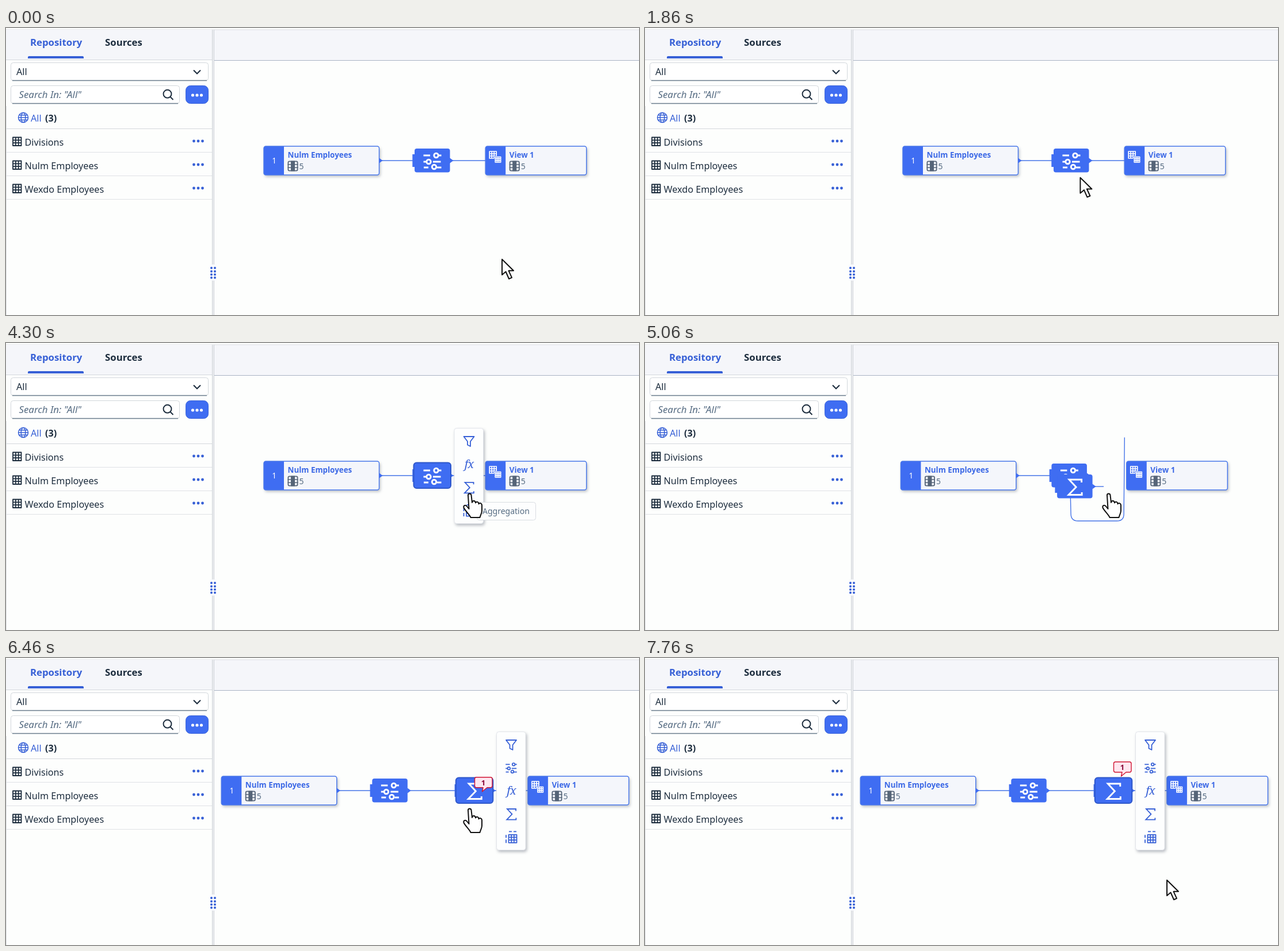
An HTML page that plays this animation: 1100x500 px, repeating every 10 s.

```html
<!DOCTYPE html>
<html lang="en">
<head>
<meta charset="utf-8">
<title>Adding an aggregation step</title>
<style>
  html, body { margin: 0; width: 100%; height: 100%; overflow: hidden; background: #fdfefd; }
  svg { display: block; width: 1100px; height: 500px; }
  text { font-family: "Noto Sans", "Open Sans", sans-serif; font-size: 16.2px; fill: #1d2d3e; white-space: pre; }
  .bold { font-weight: 700; }
  .tab { font-size: 16.8px; font-weight: 700; }
  .accent { fill: #3760d6; }
  .hint { font-size: 16.8px; font-style: italic; fill: #556b82; }
  .name { font-size: 13.4px; font-weight: 700; fill: #3c69e6; }
  .count { font-size: 14px; fill: #556b82; }
  .order { font-size: 13.5px; fill: #fff; text-anchor: middle; }
  .fx { font: italic 20px "Noto Serif", serif; letter-spacing: -1px; fill: #3760d6; text-anchor: middle; }
  .badge { font-size: 13px; font-weight: 700; fill: #8a0638; text-anchor: middle; }
  .shadow { filter: drop-shadow(2px 3px 2.5px rgba(40, 50, 70, .32)); }
  .line { fill: none; stroke: #4473e8; stroke-width: 1.4; }
  .icon { fill: none; stroke: #3760d6; stroke-width: 1.8; }
  .white { fill: none; stroke: #fff; stroke-width: 2.9; }
  .pointer { fill: #fff; stroke: #111; stroke-width: 2; stroke-linejoin: round; }
</style>
</head>
<body>
<svg id="stage" viewBox="0 0 1100 500"></svg>
<script>
const BLUE = "#3f6df2", ACCENT = "#3760d6", INK = "#1d2d3e";

const rect = (x, y, w, h, fill, more = "") =>
  `<rect x="${x}" y="${y}" width="${w}" height="${h}" fill="${fill}" ${more}/>`;
const text = (x, y, cls, value) => `<text x="${x}" y="${y}" class="${cls}">${value}</text>`;
const path = (d, more) => `<path d="${d}" ${more}/>`;
const group = (x, y, body, more = "") => `<g transform="translate(${x} ${y})" ${more}>${body}</g>`;
const dots = (x, y, gap, r, fill) =>
  [0, 1, 2].map(i => `<circle cx="${x + i * gap}" cy="${y}" r="${r}" fill="${fill}"/>`).join("");

// Icons centred on their own origin
const sliders = path(`M-15.5-10H-4M11-10H15.5M-15.5 1H-11M1 1H14.5M-15-11
  M-15 11H-7M8 11H15.5`, "") +
  [[6.5, -10], [-6.5, 1], [3, 10]].map(([x, y]) => `<circle cx="${x}" cy="${y}" r="3.7"/>`).join("");
const sigma = path("M11.5-8V-13H-10L2 0L-11 13.5H12V9", "");
const grid = (size, stroke, width) => {
  const a = size / 3, b = size * 2 / 3;
  return path(`M0 0H${size}V${size}H0ZM${a} 0V${size}M${b} 0V${size}M0 ${a}H${size}M0 ${b}H${size}`,
    `fill="none" stroke="${stroke}" stroke-width="${width}" stroke-linejoin="round"`);
};
const scaled = (k, body, width) => `<g transform="scale(${k})" class="icon" style="stroke-width:${width}">${body}</g>`;
const menuIcons = {
  filter: path("M-9-8.5H9L2.5 0V8.5L-2.5 6V0Z", 'class="icon" stroke-linejoin="round"'),
  sliders: scaled(.63, sliders, 2.8),
  formula: text(0, 6, "fx", "fx"),
  sigma: scaled(.7, sigma, 2.6),
  columns: group(-4.5, -4.5, grid(14, ACCENT, 1.8)) +
    path("M-4-10H1M4-10H9M-9-4V1M-9 4V10", 'class="icon"')
};

const menu = (id, x, y, names) => {
  const height = names.length * 40 + 6;
  const items = names.map((name, i) => group(25.5, 23 + i * 40.2, menuIcons[name])).join("");
  return group(x, y, rect(0, 0, 50.5, height, "#fdfefe",
    'rx="4" stroke="#e2e5ea" class="shadow"') + items, `id="${id}" opacity="0"`);
};

const countIcon = group(0, 0, rect(.9, .9, 16.2, 16.2, "none", 'rx="2" stroke="#566578" stroke-width="1.8"') +
  rect(5.5, 0, 7, 18, "#566578") + path("M0 6.2H18M0 11.8H18", 'stroke="#566578" stroke-width="1.6"'));

const card = (width, name, mark) =>
  rect(.5, .5, width, 50, "#f4f6fb", 'rx="3.5" class="shadow"') +
  path("M4 .5H35.5V50.5H4Q.5 50.5 .5 47V4Q.5 .5 4 .5Z", `fill="${BLUE}"`) +
  rect(.5, .5, width, 50, "none", 'rx="3.5" stroke="#4a78ea" stroke-width="1.5"') +
  mark + text(42, 20.5, "name", name) + group(42, 26, countIcon) + text(62, 40.5, "count", "5");

const step = (icon, selectedId) =>
  rect(-3.7, 10, 6, 22, BLUE) + path("M61 16.3L67.5 21L61 25.7Z", `fill="${BLUE}"`) +
  rect(0, 0, 61.5, 41.5, BLUE, 'rx="4"') +
  rect(-1.5, -1.5, 64.5, 44.5, BLUE, `id="${selectedId}" rx="5" stroke="#2f58ca" stroke-width="2" visibility="hidden"`) +
  group(31, 22, icon, 'class="white"');

const outPort = x => path(`M${x} 21L${x + 6} 25.5L${x} 30Z`, `fill="${BLUE}"`);

const sidebar = () => {
  const rows = ["Divisions", "Nulm Employees", "Wexdo Employees"].map((name, i) => group(0, i * 41,
    group(12, 190.5, grid(14.5, INK, 1.8)) + text(32.5, 205, "", name) +
    dots(326.5, 197, 7.5, 2.4, ACCENT) + rect(1, 216, 357, 1, "#dfe2e6"))).join("");
  const field = (y, w, h) => rect(8.5, y, w, h, "#fff", 'rx="4" stroke="#d3d7dc"') +
    path(`M11 ${y + h}H${w + 6}`, 'stroke="#6a7c8c" stroke-width="1.3"');
  const grip = [418, 424, 429.5, 435].map(y =>
    [357, 363].map(x => `<circle cx="${x}" cy="${y}" r="2" fill="${ACCENT}"/>`).join("")).join("");
  return rect(0, 3, 358, 52, "#f5f6fa") + rect(0, 55, 358, 1, "#d4d8dd") +
    rect(0, 136, 1, 364, "#dcdfe3") +
    text(42, 31, "tab accent", "Repository") + text(172, 31, "tab", "Sources") +
    path("M38 53V51Q38 49 40 49H133Q135 49 135 51V53Z", `fill="${ACCENT}"`) +
    field(60.5, 343, 31) + text(18, 82, "", "All") +
    path("M326 73.5L332 79.5L338 73.5", `fill="none" stroke="${INK}" stroke-width="2.1"`) +
    field(100.5, 293, 31) + text(22.5, 122, "hint", "Search In: \"All\"") +
    path("M287.5 114.8A7 7 0 1 1 273.5 114.8A7 7 0 1 1 287.5 114.8M285.5 120L290.5 125",
      `fill="none" stroke="${INK}" stroke-width="2"`) +
    rect(312.5, 100.5, 39, 31, BLUE, 'rx="8" stroke="#3a64da"') + dots(324.5, 117, 7.5, 2.6, "#fff") +
    group(30, 156, `<circle r="8.5"/><ellipse rx="3.8" ry="8.5"/>` +
      path("M-8.5 0H8.5M-7.3-4.3H7.3M-7.3 4.3H7.3", ""), 'class="icon" style="stroke-width:1.5"') +
    text(43, 163, "accent", "All") + text(68, 163, "bold", "(3)") +
    rect(1, 175, 357, 1, "#d4d8dd") + rows +
    rect(358, 3, 4, 497, "#eceef1") + rect(358, 3, 1, 497, "#cfd3d8") + rect(361, 3, 1, 497, "#cfd3d8") +
    rect(354, 412, 12, 28, "#fafbfd") + grip;
};

const tableCard = card(200.5, "Nulm Employees", text(18.5, 30.5, "order", "1")) + outPort(201);
const viewMark = group(7.5, 9.5, grid(12, "#fff", 1.7)) +
  rect(16, 17.5, 12, 12, BLUE) + group(17.5, 19, grid(9.5, "#fff", 1.6));
const viewCard = card(175.5, "View 1", viewMark);

document.getElementById("stage").innerHTML =
  rect(0, 0, 1100, 500, "#fdfefd") + rect(362, 3, 738, 53, "#f5f6fa") +
  rect(0, 2.5, 1100, 1, "#dcdee1") + rect(362, 56, 738, 1, "#a9b3c4") + sidebar() +
  ["inLine", "linkLine", "outLine"].map(id => `<path id="${id}" class="line"/>`).join("") +
  `<g id="table">${tableCard}</g><g id="project">${step(sliders, "projectSelected")}</g>` +
  `<g id="aggregate">${step(sigma, "aggregateSelected")}</g><g id="view">${viewCard}</g>` +
  menu("menuA", 779, 148.5, ["filter", "formula", "sigma", "columns"]) +
  menu("menuB", 852.5, 128.5, ["filter", "sliders", "formula", "sigma", "columns"]) +
  `<g id="badge">${path("M817.5 181H842Q845 181 845 184V196Q845 199 842 199H836L827.5 206L829 199H817.5Q814.5 199 814.5 196V184Q814.5 181 817.5 181Z",
    'fill="#ffe6ef" stroke="#d01432" stroke-width="1.4" stroke-linejoin="round"')}${text(829.5, 194.8, "badge", "1")}</g>` +
  `<g id="tip">${rect(818.5, 277.5, 102, 31, "#fdfefe", 'rx="4" stroke="#d9dde2"')}${text(828, 298, "count", "Aggregation")}</g>` +
  `<g id="arrow" class="pointer">${path("M1 1V28L7.5 22.5L13 35L18 32.8L12.5 20.8H21Z", "")}</g>` +
  `<g id="hand" class="pointer">${path(`M-2.5 3C-2.5-.5 2.5-.5 3 3L4.5 16C5 12 10 12 10.5 16.5C12 13.5 16 14.5 16 18.5
    C18 16 21.5 17 21.5 21V30C21.5 35 19 37 18 42H2C1 38-7 31-10 25C-11-20.5-11 20.5-5 22L-1 27Z`
    .replace("C-11-20.5-11 20.5-5 22", "C-11 21-7.5 19.5-5 22"), "")}</g>`;

const el = {};
document.querySelectorAll("[id]").forEach(node => el[node.id] = node);

const phase = (t, start, length) => Math.min(1, Math.max(0, (t - start) / length));
const inOut = p => p < .5 ? 4 * p ** 3 : 1 - 4 * (1 - p) ** 3;
const easeOut = p => 1 - (1 - p) ** 2.5;
const mix = (a, b, k) => a + (b - a) * k;
const move = (node, x, y) => node.setAttribute("transform", `translate(${x} ${y})`);
const show = (node, on) => node.setAttribute("visibility", on ? "visible" : "hidden");

// start, length, from, to, sideways bend, easing
const moves = [
  [1170, 1030, [861, 402], [745, 236], [-25, 0], inOut],
  [3000, 730, [745, 236], [805, 262], [0, 8], easeOut],
  [6620, 1140, [805, 262], [906, 386], [0, 0], inOut]
];
function pointerAt(t) {
  const [start, length, from, to, bend, ease] = moves.filter(m => t >= m[0]).pop() || moves[0];
  const k = ease(phase(t, start, length));
  return [0, 1].map(i => mix(from[i], to[i], k) + 2 * k * (1 - k) * bend[i]);
}

function roundedLine(points, r) {
  const [a, b, c, d] = points;
  const toward = (p, q) => {
    const n = Math.hypot(q[0] - p[0], q[1] - p[1]), k = Math.min(.5, r / n);
    return `${mix(p[0], q[0], k)} ${mix(p[1], q[1], k)}`;
  };
  return `M${a}L${toward(b, a)}Q${b} ${toward(b, c)}L${toward(c, b)}Q${c} ${toward(c, d)}L${d}`;
}
const detour = [[741, 262], [741, 314], [836, 314], [836, 161]];
const straight = [[703, 231], [729, 231], [754, 231], [781, 231]];

function draw(t) {
  const added = t >= 4930;
  const k = inOut(phase(t, 4945, 505));
  const shift = 73.7 * k;
  const ax = mix(712.7, 783.3, k), ay = mix(230, 210, k);

  move(el.table, 447.5 - shift, 205.5);
  move(el.project, 710 - shift, 210);
  move(el.view, 832.7 + shift, 205.5);
  move(el.aggregate, ax, ay);
  show(el.aggregate, added);

  el.inLine.setAttribute("d", `M${653 - shift} 231H${708 - shift}`);
  el.outLine.setAttribute("d", added
    ? `M${ax + 64} ${ay + 21}L${mix(791.5, 907, k)} ${ay + 21}` : "M775 231H833");
  show(el.linkLine, added);
  el.linkLine.setAttribute("d", roundedLine(
    detour.map((p, i) => p.map((v, j) => mix(v, straight[i][j], k))), 12));

  show(el.projectSelected, t >= 1890 && !added);
  el.projectSelected.setAttribute("fill", t >= 2230 && t < 2530 ? "#3a66e6" : BLUE);
  show(el.aggregateSelected, t >= 5430);
  el.menuA.setAttribute("opacity", added ? 0 : phase(t, 2500, 230));
  el.menuB.setAttribute("opacity", phase(t, 5410, 220));
  show(el.tip, t >= 4300 && !added);
  show(el.badge, t >= 6330);
  move(el.badge, 0, 27 * Math.sin(Math.PI * phase(t, 6310, 330)));

  const [x, y] = pointerAt(t), hand = t >= 3250 && t < 6620;
  move(el.arrow, x, y);
  move(el.hand, x + .5, y);
  show(el.arrow, !hand);
  show(el.hand, hand);
}

const began = performance.now();
function tick() {
  draw((performance.now() - began) % 10000);
  requestAnimationFrame(tick);
}
tick();
</script>
</body>
</html>
```
